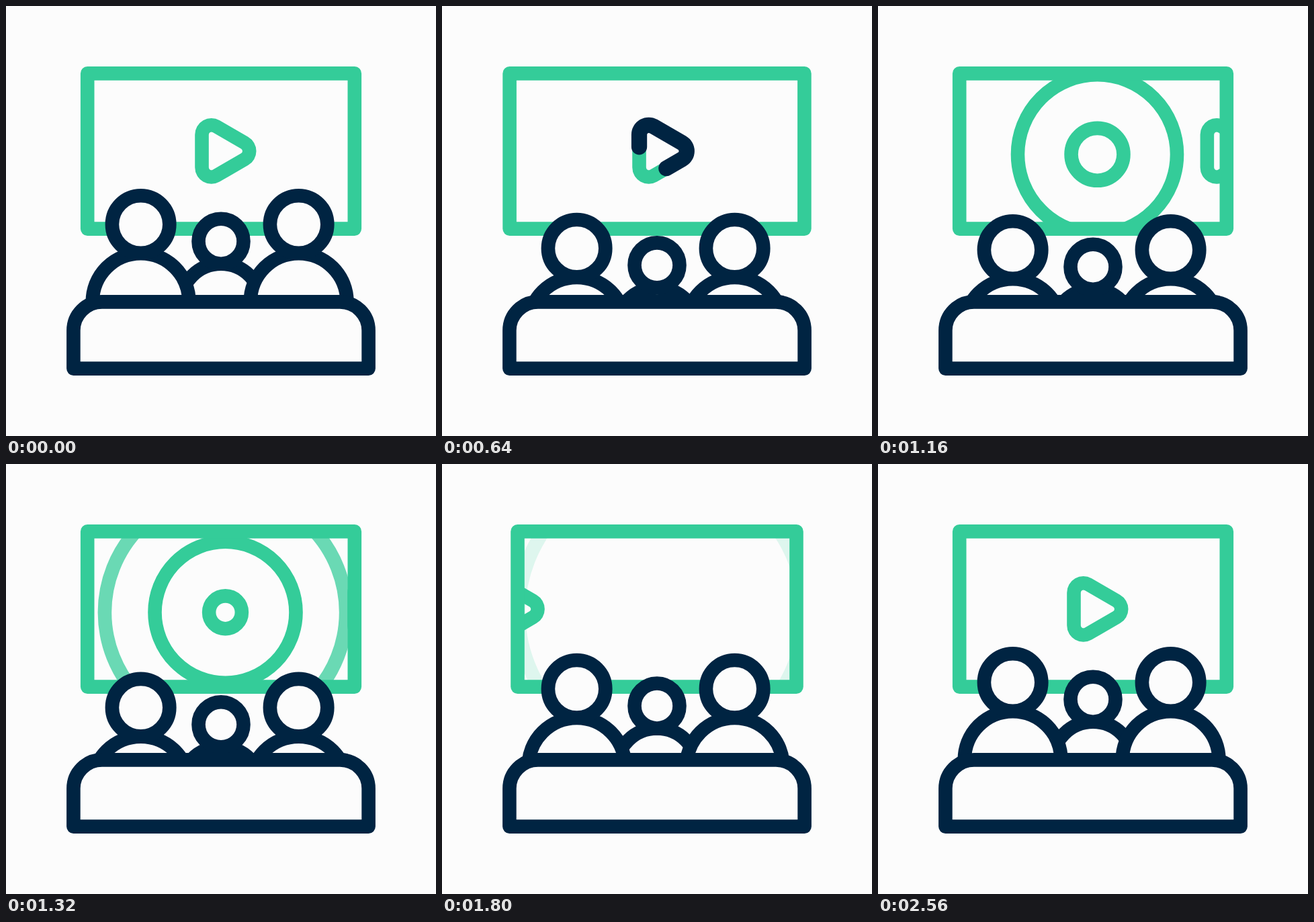
An HTML page that plays this animation: 640 px wide and 640 px high, repeating every 2.64 s.

```html
<!DOCTYPE html>
<html lang="en">
<head>
<meta charset="utf-8">
<title>Cinema</title>
<style>
  html, body { margin: 0; width: 100%; height: 100%; overflow: hidden; background: #fcfcfc; }
  svg { display: block; width: 100%; height: 100%; }
  .green, .navy { fill: none; stroke-width: 20.6; stroke-linejoin: round; }
  .green { stroke: #34cc99; }
  .navy { stroke: #002442; }
  .solid { fill: #fcfcfc; }
</style>
</head>
<body>
<svg viewBox="0 0 640 640">
  <defs>
    <path id="play" pathLength="100" d="M321 247.9L312.8 252.6A14.2 14.2 0 0 1 291.5 240.3V191.5A14.2 14.2 0 0 1 312.8 179.2L355.1 203.6A14.2 14.2 0 0 1 355.1 228.2Z"/>
    <clipPath id="inside"><rect id="hole" y="101" height="230"/></clipPath>
    <clipPath id="seatTop"><rect width="640" height="440"/></clipPath>
  </defs>

  <g clip-path="url(#inside)">
    <g id="rings" class="green"></g>
    <g id="button">
      <use href="#play" class="green"/>
      <use href="#play" id="trace" class="navy" stroke-linecap="round"/>
    </g>
  </g>
  <rect id="screen" class="green" y="100.4" height="231.2"/>

  <g clip-path="url(#seatTop)">
    <g id="people" class="navy solid">
      <circle cx="320" cy="444.8" r="61"/>
      <circle cx="320" cy="350.2" r="33.5"/>
      <circle cx="200.6" cy="440" r="71.8"/>
      <circle cx="200.6" cy="325" r="42.7"/>
      <circle cx="435.6" cy="440" r="71.8"/>
      <circle cx="435.6" cy="325" r="42.7"/>
    </g>
  </g>
  <path class="navy" d="M100.4 539.6V483a42.6 42.6 0 0 1 42.6-42.6H497a42.6 42.6 0 0 1 42.6 42.6V539.6Z"/>
</svg>
<script>
const LOOP = 2640, STEP = 40, LAST = 2560;
const RING_STARTS = [876, 1070, 1264];

const $ = id => document.getElementById(id);
const set = (el, attrs) => { for (const k in attrs) el.setAttribute(k, attrs[k]); };
const clamp = x => Math.min(1, Math.max(0, x));
const span = (t, from, to) => clamp((t - from) / (to - from));
const smooth = x => x * x * (3 - 2 * x);
const ease = (t, from, to) => smooth(span(t, from, to));

// cubic-bezier(.33, 0, .3, 1), solved by bisection
function settle(t, from, to) {
  const x = span(t, from, to);
  let lo = 0, hi = 1;
  for (let i = 0; i < 24; i++) {
    const u = (lo + hi) / 2, v = 1 - u;
    if (.99 * v * v * u + .9 * v * u * u + u * u * u < x) lo = u; else hi = u;
  }
  return smooth((lo + hi) / 2);
}

const rings = RING_STARTS.map(start => {
  const el = document.createElementNS('http://www.w3.org/2000/svg', 'circle');
  set(el, { cx: 326.5, cy: 220.8 });
  $('rings').append(el);
  return { el, start };
});

function drawScreen(t) {
  const wide = ease(t, 0, 440) - ease(t, 620, 960) + ease(t, 1640, 2000) - ease(t, 2140, 2500);
  const x = 121.2 - 20.8 * wide;
  set($('screen'), { x, width: 640 - 2 * x });
  set($('hole'), { x, width: 640 - 2 * x });
}

function drawButton(t) {
  const x = t < 1480 ? 227 * ease(t, 600, 1320) : -248 * (1 - ease(t, 1640, 2400));
  set($('button'), {
    transform: `translate(${x} 0)`,
    visibility: t > 1320 && t < 1640 ? 'hidden' : 'visible'
  });

  const head = 100 * ease(t, 210, 710), tail = 100 * ease(t, 460, 960);
  const length = Math.max(.05, head - tail), from = Math.min(tail, 99.9);
  $('trace').style.strokeWidth = 20.6 + 4.9 * span(t, 240, 960);
  set($('trace'), {
    'stroke-dasharray': `${length} 200`,
    'stroke-dashoffset': -from,
    visibility: t > 210 && t < 1000 ? 'inherit' : 'hidden'
  });
}

function drawRings(t) {
  for (const { el, start } of rings) {
    const age = t - start;
    set(el, {
      r: age > 0 ? .44 * age - 8e-5 * age * age : 0,
      opacity: age > 0 ? 1 - span(age, 400, 560) : 0
    });
  }
}

function drawPeople(t) {
  const y = 38 * (settle(t, 0, 880) - settle(t, 1260, 2330));
  set($('people'), { transform: `translate(0 ${y})` });
}

function frame() {
  const t = Math.min(LAST, Math.floor(performance.now() % LOOP / STEP) * STEP);
  drawScreen(t);
  drawButton(t);
  drawRings(t);
  drawPeople(t);
  requestAnimationFrame(frame);
}
frame();
</script>
</body>
</html>
```
